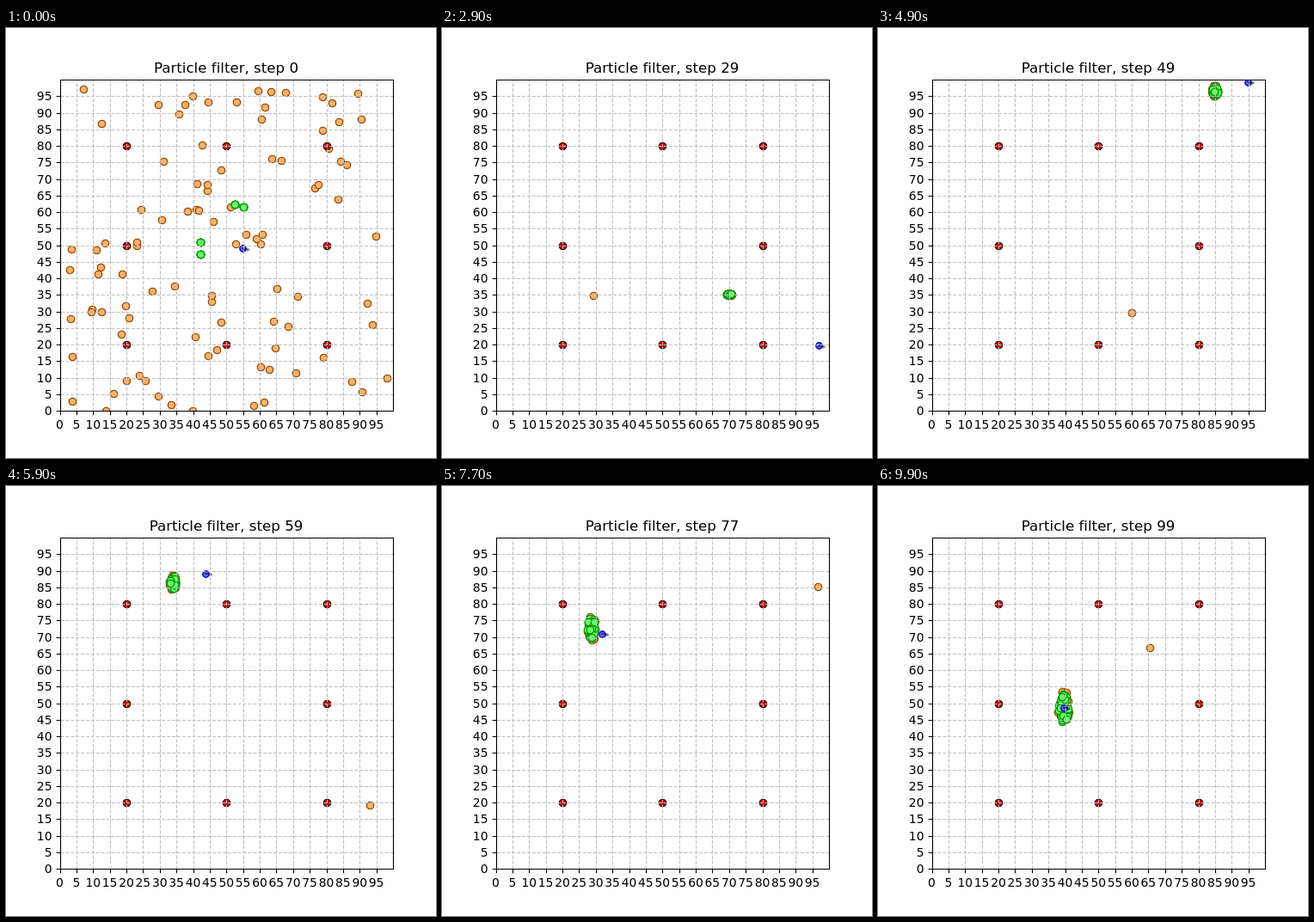
These frames come from a looping animation (500x500 px, 10 s). An HTML page:

```html
<!DOCTYPE html>
<html lang="en">
<head>
<meta charset="utf-8">
<title>Particle filter</title>
<style>
  html, body { margin: 0; width: 100%; height: 100%; overflow: hidden; background: #fff; }
  svg { display: block; width: 500px; height: 500px; }
  text {
    font-family: "DejaVu Sans", sans-serif;
    font-size: 13.89px;
    font-variant-ligatures: none;
  }
  .title { font-size: 16.67px; text-anchor: middle; }
</style>
</head>
<body>
<svg viewBox="0 0 500 500">
  <defs><clipPath id="plot"><rect x="63" y="60" width="387.5" height="385.5"/></clipPath></defs>
  <text class="title" id="title" x="256" y="52"></text>
  <g id="scene" clip-path="url(#plot)" stroke-width="1.39"></g>
  <g id="grid" stroke="#bfbfbf" stroke-width="1.11" stroke-dasharray="4.11 1.78"></g>
  <g id="axes" stroke="#000" stroke-width="1.11" fill="none"></g>
  <g id="labels"></g>
</svg>
<script>
const STEP_MS = 100, STEPS = 100;
const HEADING = -0.2041, SPEED = 5, START = [54.8, 49];
const PARTICLES = 100;

const $ = id => document.getElementById(id);
const px = u => 62.5 + 3.875 * u;
const py = v => 445 - 3.85 * v;
const snap = n => Math.floor(n + 0.5) + 0.5;
const wrap = n => ((n % 100) + 100) % 100;
const repeat = (count, make) => Array.from({ length: count }, (_, i) => make(i)).join('');

const ORANGE = { fill: '#ffb266', stroke: '#994c00', r: 4.17 };
const GREEN = { fill: '#66ff66', stroke: '#009900', r: 4.17 };
const RED = { fill: '#cc0000', stroke: '#330000', r: 4.17 };
const BLUE = { fill: '#6666ff', stroke: '#0000cc', r: 3.7 };

const landmarks = [20, 50, 80].flatMap(x => [20, 50, 80].map(y => [x, y]))
  .filter(([x, y]) => x !== 50 || y !== 50);

// The few survivors of the first resampling.
const survivors = [[52.5, 62.3], [55.1, 61.5], [42.2, 50.9], [42.2, 47.2]];

// Where the estimate sits relative to the robot after each regrouping.
const estimates = [
  { from: 1, dx: -12.7, dy: 0 },
  { from: 7, dx: 13.3, dy: 17.8 },
  { from: 25, dx: -26.8, dy: 15.5 },
  { from: 34, dx: -3, dy: 3 },
  { from: 42, dx: -9.7, dy: -2.7 },
  { from: 60, dx: -3.1, dy: 1.8 },
  { from: 78, dx: 0, dy: 0 }
];

function seeded(seed) {
  let a = Math.imul(seed + 1, 0x9e3779b1);
  return () => {
    a = (a + 0x6d2b79f5) | 0;
    let t = Math.imul(a ^ (a >>> 15), 1 | a);
    t = (t + Math.imul(t ^ (t >>> 7), 61 | t)) ^ t;
    return ((t ^ (t >>> 14)) >>> 0) / 4294967296;
  };
}

const dot = ([u, v], { fill, stroke, r }) =>
  `<circle cx="${snap(px(u))}" cy="${snap(py(v))}" r="${r}" fill="${fill}" stroke="${stroke}"/>`;

function scatteredParticles() {
  const rnd = seeded(5);
  const loose = repeat(PARTICLES - survivors.length, () => dot([100 * rnd(), 100 * rnd()], ORANGE));
  // Copies pile up on each survivor, which thickens its rim.
  return loose + survivors.map(p => dot(p, GREEN).repeat(8)).join('');
}

function groupedParticles(step, robot) {
  const rnd = seeded(step);
  const { dx, dy } = estimates.findLast(e => e.from <= step);
  const width = 0.4 + 0.011 * step;
  const height = 0.3 + 0.06 * Math.max(0, step - 30);
  const member = spread => {
    const r = spread * Math.sqrt(rnd()), a = 2 * Math.PI * rnd();
    return [
      wrap(robot[0] + dx + width * r * Math.cos(a)),
      wrap(robot[1] + dy + height * r * Math.sin(a))
    ];
  };
  return dot([100 * rnd(), 100 * rnd()], ORANGE) +
    repeat(30, () => dot(member(1.2), ORANGE)) +
    repeat(40, () => dot(member(1), GREEN));
}

function robotArrow([u, v]) {
  const c = Math.cos(HEADING), s = Math.sin(HEADING);
  const outline = [[0, .1], [0, -.1], [1.6, -.1], [1.6, -.3], [2, 0], [1.6, .3], [1.6, .1]];
  const points = outline.map(([x, y]) => `${px(u + x * c - y * s)},${py(v + x * s + y * c)}`);
  return `<polygon points="${points.join(' ')}" fill="#000" stroke="#000" opacity=".5"/>`;
}

function draw(step) {
  const robot = [
    wrap(START[0] + step * SPEED * Math.cos(HEADING)),
    wrap(START[1] + step * SPEED * Math.sin(HEADING))
  ];
  $('title').textContent = `Particle filter, step ${step}`;
  $('scene').innerHTML =
    (step ? groupedParticles(step, robot) : scatteredParticles()) +
    landmarks.map(p => dot(p, RED)).join('') +
    dot(robot, BLUE) + robotArrow(robot);
}

function drawAxes() {
  let grid = '', ticks = '', labels = '';
  for (let n = 0; n < 100; n += 5) {
    const x = snap(px(n)), y = snap(py(n));
    grid += `<path d="M${x} 445.5V60.5M63.5 ${y}H450.5"/>`;
    ticks += `M${x} 445.5v4.86M63.5 ${y}h-4.86`;
    labels += `<text x="${px(n)}" y="466" text-anchor="middle">${n}</text>` +
      `<text x="53.5" y="${Math.round(py(n) + 5)}" text-anchor="end">${n}</text>`;
  }
  $('grid').innerHTML = grid;
  $('axes').innerHTML = `<path d="${ticks}"/><path d="M63.5 60.5H450.5V445.5H63.5Z"/>`;
  $('labels').innerHTML = labels;
}

const start = performance.now();
let shown = -1;
function tick() {
  const step = Math.floor((performance.now() - start) / STEP_MS) % STEPS;
  if (step !== shown) draw(shown = step);
  requestAnimationFrame(tick);
}
drawAxes();
tick();
</script>
</body>
</html>
```
